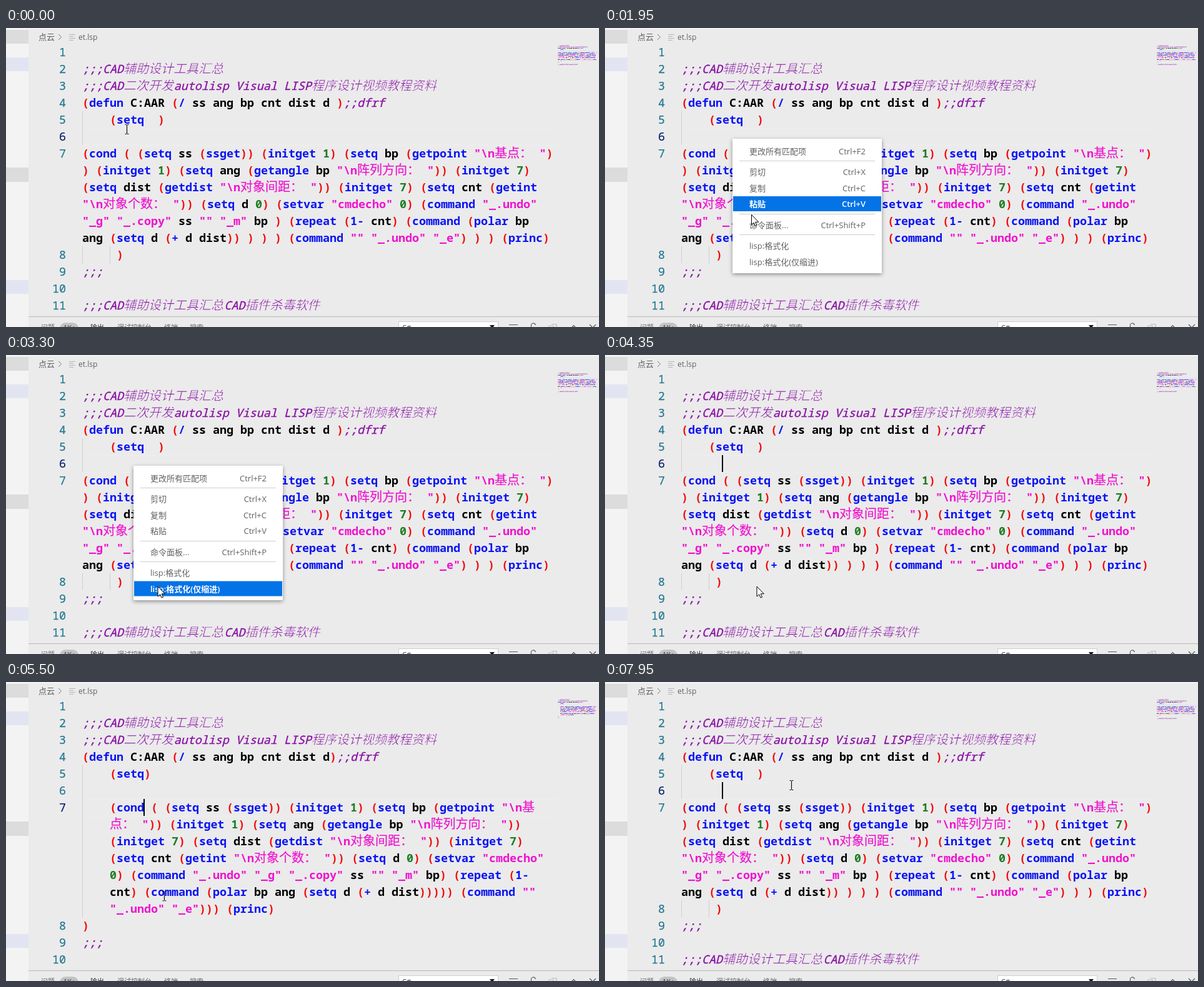
These frames come from a looping animation (949 px wide and 478 px high, 8000 ms). An HTML page:

```html
<!DOCTYPE html>
<html lang="zh">
<head>
<meta charset="utf-8">
<title>et.lsp</title>
<style>
html, body { margin: 0; width: 100%; height: 100%; overflow: hidden; background: #ebebeb; }
svg { display: block; width: 949px; height: 478px; }
text { white-space: pre; }
.code text, .nums text { font: 18.33px "Noto Sans Mono", monospace; }
.code .cjk { font: 300 20px "Noto Sans CJK SC", "Noto Sans CJK", sans-serif; }
.code .par { fill: #f50a0a; font-weight: 600; }
.code .key { fill: #0a14f5; font-weight: 600; }
.code .var { fill: #000; font-weight: 600; }
.code .str { fill: #f012cf; font-weight: 600; }
.code .str.cjk { font-weight: 400; stroke: #f012cf; stroke-width: .2; }
.code .num { fill: #1f7d22; font-weight: 600; }
.code .com { fill: #8a10a6; font-style: italic; stroke: #8a10a6; stroke-width: .35; }
.code.plain text { fill: #000; font-weight: 400; font-style: normal; stroke: none; }
/* a background-coloured outline thins the ideographs */
.code .com.cjk, .code.plain .cjk { font-weight: 300; stroke: #ebebeb; stroke-width: .55; }
.nums text { fill: #237893; stroke: #237893; stroke-width: .25; text-anchor: end; }
.nums .on { fill: #0b216f; stroke: #0b216f; }
.ui { font: 13px "Open Sans", "Noto Sans CJK SC", "Noto Sans CJK", sans-serif; fill: #616161; }
.hot { fill: #fff; font-weight: 600; }
.tabs { font: 11px "Open Sans", "Noto Sans CJK SC", "Noto Sans CJK", sans-serif; fill: #666; }
</style>
</head>
<body>
<svg viewBox="0 0 949 478">
  <rect width="949" height="478" fill="#ebebeb"/>
  <rect x="36" width="913" height="2" fill="#f4f4f4"/>
  <rect width="36" height="478" fill="#f3f3f3"/>
  <g fill="#dcdcdc"><rect y="3" width="36" height="22"/><rect y="223" width="36" height="23"/></g>
  <g fill="#e2e5f1"><rect y="47" width="36" height="22"/><rect y="403" width="36" height="22"/></g>

  <g class="ui">
    <text x="52" y="19">点云</text>
    <text x="116" y="19" font-size="12" style="font-size:12px">et.lsp</text>
  </g>
  <path d="M84 10l4.5 4.5-4.5 4.5" fill="none" stroke="#777"/>
  <path d="M101 10.5h10M101 13.5h7M101 16.5h10M101 19.5h7" stroke="#b4b4b4"/>

  <g id="editor"></g>

  <path d="M36 461.5h913" stroke="#b9b9b9"/>
  <g class="tabs">
    <text x="56" y="483">问题</text>
    <rect x="86" y="471" width="30" height="18" rx="9" fill="#c4c4c4"/>
    <text x="92" y="483" fill="#333">1K+</text>
    <text x="135" y="483" fill="#333">输出</text>
    <text x="178" y="483">调试控制台</text>
    <text x="253" y="483">终端</text>
    <text x="294" y="483">搜索</text>
    <rect x="628.5" y="469.5" width="159" height="20" fill="#fff" stroke="#cecece"/>
    <text x="634" y="483" fill="#333">C#</text>
  </g>
  <path d="M774 475h8l-4 5z" fill="#111"/>
  <g fill="none" stroke="#555" stroke-width="1.2">
    <path d="M805 474.5h14M805 478.5h14"/>
    <path d="M840.5 478v-2a3.5 3.5 0 0 1 7 -1"/>
    <path d="M904 480l4.5-4.5 4.5 4.5"/>
    <path d="M934 474l10 10M944 474l-10 10"/>
    <path d="M869 478v-2h7v2M873 473.5h8v5" stroke="#bbb"/>
  </g>

  <g id="menu"></g>
  <path id="beam" d="M-3 -7.5h2.5M.5 -7.5h2.5M0 -7v14M-3 7.5h2.5M.5 7.5h2.5" stroke="#111" stroke-width="1.2"/>
  <path id="arrow" d="M.5.5V16.5L4.2 13.2 6.6 18.6 9 17.6 6.7 12.3H11.8Z" fill="#fff" stroke="#000"/>
</svg>
<script>
const LOOP = 8000, STEP = 50, ROW = 27, COL = 11, LEFT = 122;
const $ = id => document.getElementById(id);

function add(parent, tag, attrs = {}, text = '') {
  const el = document.createElementNS('http://www.w3.org/2000/svg', tag);
  for (const k in attrs) el.setAttribute(k, attrs[k]);
  if (text) el.textContent = text;
  return parent.appendChild(el);
}

const HEAD = String.raw`
;;;CAD辅助设计工具汇总
;;;CAD二次开发autolisp Visual LISP程序设计视频教程资料
`;
const MESSY = HEAD + String.raw`(defun C:AAR (/ ss ang bp cnt dist d );;dfrf
    (setq  )

(cond ( (setq ss (ssget)) (initget 1) (setq bp (getpoint "\n基点： ")
) (initget 1) (setq ang (getangle bp "\n阵列方向： ")) (initget 7)
(setq dist (getdist "\n对象间距： ")) (initget 7) (setq cnt (getint
"\n对象个数： ")) (setq d 0) (setvar "cmdecho" 0) (command "_.undo"
"_g" "_.copy" ss "" "_m" bp ) (repeat (1- cnt) (command (polar bp
ang (setq d (+ d dist)) ) ) ) (command "" "_.undo" "_e") ) ) (princ)
     )
;;;

;;;CAD辅助设计工具汇总CAD插件杀毒软件`;
const TIDY = HEAD + String.raw`(defun C:AAR (/ ss ang bp cnt dist d);;dfrf
    (setq)

    (cond ( (setq ss (ssget)) (initget 1) (setq bp (getpoint "\n基
    点： ")) (initget 1) (setq ang (getangle bp "\n阵列方向： "))
    (initget 7) (setq dist (getdist "\n对象间距： ")) (initget 7)
    (setq cnt (getint "\n对象个数： ")) (setq d 0) (setvar "cmdecho"
    0) (command "_.undo" "_g" "_.copy" ss "" "_m" bp) (repeat (1-
    cnt) (command (polar bp ang (setq d (+ d dist))))) (command ""
    "_.undo" "_e"))) (princ)
)
;;;
`;
const KEYS = new Set(('defun / setq cond ssget initget getpoint getangle getdist getint ' +
  'setvar command repeat 1- polar + princ').split(' '));
const TOKEN = /;[^\n]*|"[^"]*"|[()]|\s+|[^\s()";]+/g;

function kind(tok) {
  if (tok[0] === ';') return 'com';
  if (tok[0] === '"') return 'str';
  if (tok === '(' || tok === ')') return 'par';
  if (/^\d+$/.test(tok)) return 'num';
  return KEYS.has(tok) ? 'key' : 'var';
}

function typeset(g, source, wide) {
  let x = LEFT, row = 0;
  for (const tok of source.match(TOKEN)) {
    tok.split('\n').forEach((line, i) => {
      if (i) { row++; x = LEFT; }
      for (const run of line.match(/[ -~]+|[^ -~]+/g) || []) {
        const cjk = run > '~';
        if (run.trim()) {
          add(g, 'text', { x, y: 45 + ROW * row, class: kind(tok) + (cjk ? ' cjk' : '') }, run);
        }
        x += run.length * (cjk ? wide : COL);
      }
    });
  }
}

// One complete editor state: guides, active line, numbers, code, minimap.
function buildView(name, source, plain, active, lastWrap, guides) {
  const g = add($('editor'), 'g'), top = 25 + ROW * active;
  add(g, 'path', { d: `M${LEFT} ${top + .5}H882M${LEFT} ${top + ROW + .5}H882`, stroke: '#efefef' });
  add(g, 'path', { d: guides, stroke: '#cfcfcf' });
  const nums = add(g, 'g', { class: 'nums' });
  for (let r = 0; r < 16; r++) {
    if (r > 6 && r <= lastWrap) continue;
    add(nums, 'text', { x: 96, y: 45 + ROW * r, class: r === active ? 'on' : '' },
      r <= 6 ? r + 1 : r + 7 - lastWrap);
  }
  const code = add(g, 'g', { id: name, class: plain ? 'code plain' : 'code' });
  typeset(code, source, plain ? 20 : 20.2);
  add(g, 'rect', { x: 883, y: 23.8 + top * .08, width: 66, height: 2, fill: '#dae7f6' });
  // two layers, so that the tiny text is dense enough
  for (let i = 0; i < 2; i++) {
    add(g, 'use', { href: '#' + name, transform: 'translate(873.2 23.2) scale(.083 .08)' });
  }
  return g;
}

const GUIDE_A = 'M122.5 133v54M122.5 349v27M166.5 349v27';
const GUIDE_B = 'M122.5 133v243';
const views = {
  messy: buildView('messy', MESSY, false, 5, 11, GUIDE_A),
  messyPlain: buildView('messyPlain', MESSY, true, 5, 11, GUIDE_A),
  tidy: buildView('tidy', TIDY, false, 6, 12, GUIDE_B),
  tidyPlain: buildView('tidyPlain', TIDY, true, 6, 12, GUIDE_B)
};
const caret = add($('editor'), 'rect', { width: 2, height: ROW });

// Context menu
const menu = $('menu');
menu.style.filter = 'drop-shadow(0 2px 3px rgba(0,0,0,.4))';
add(menu, 'rect', { x: 204, y: 177, width: 239, height: 215, fill: '#fff' });
add(menu, 'path', { d: 'M215 212.5h217M215 297.5h217M215 330.5h217', stroke: '#cfcfcf' });
const items = [
  [197, '更改所有匹配项', 'Ctrl+F2'], [230, '剪切', 'Ctrl+X'], [256, '复制', 'Ctrl+C'],
  [281, '粘贴', 'Ctrl+V'], [315, '命令面板...', 'Ctrl+Shift+P'],
  [348, 'lisp:格式化', ''], [373.5, 'lisp:格式化(仅缩进)', '']
].map(([y, label, keys]) => {
  const bar = add(menu, 'rect', { x: 205, y: y - 12, width: 237, height: 24, fill: '#0473e6' });
  const texts = [
    add(menu, 'text', { x: 231, y: y + 5 }, label),
    add(menu, 'text', { x: 417, y: y + 5, 'text-anchor': 'end' }, keys)
  ];
  return { y, bar, texts };
});

// Pointer path: time, x, y
const PATH = [
  [0, 193.5, 162], [100, 195.5, 162], [200, 195.5, 162], [250, 206.5, 175], [350, 206.5, 175],
  [400, 207, 177], [1200, 207, 177], [1250, 205, 176], [1750, 205, 176], [1950, 234, 298],
  [2050, 236, 330], [2400, 236, 330], [3250, 242, 368], [3300, 242.5, 369.5], [4350, 242.5, 369.5],
  [4400, 244.5, 370], [5400, 244.5, 370], [5850, 315.5, 150], [7500, 315.5, 150],
  [7800, 298.5, 165], [LOOP, 298.5, 165]
];
function pointer(t) {
  const i = Math.max(1, PATH.findIndex(k => k[0] >= t));
  const [t0, x0, y0] = PATH[i - 1], [t1, x1, y1] = PATH[i];
  const p = (t - t0) / (t1 - t0), e = p * p * (3 - 2 * p);
  return [x0 + (x1 - x0) * e, y0 + (y1 - y0) * e];
}

const within = (t, ...spans) => spans.some(([a, b]) => t >= a && t < b);
const show = (el, on) => el.setAttribute('visibility', on ? 'visible' : 'hidden');

function draw(ms) {
  const t = Math.floor(ms % LOOP / STEP) * STEP;

  const view = t < 4550 || t >= 7050 ? 'messy' : t < 4600 ? 'tidyPlain' : t < 7000 ? 'tidy' : 'messyPlain';
  for (const k in views) views[k].style.display = k === view ? '' : 'none';

  const tidy = view.startsWith('tidy');
  caret.setAttribute('x', tidy ? 220 : 187);
  caret.setAttribute('y', tidy ? 187 : 160);
  show(caret, within(t, [4350, 4900], [5400, 5900], [6400, 6900], [7000, 7500], [7950, LOOP]));

  menu.style.opacity = t < 4350 ? Math.min(1, Math.max(0, (t - 1250) / 150)) : 0;
  const hoverY = pointer(Math.max(0, t - STEP))[1];
  for (const { y, bar, texts } of items) {
    const hot = t > 1800 && Math.abs(hoverY - y) <= 12.7;
    show(bar, hot);
    texts.forEach(el => el.setAttribute('class', hot ? 'ui hot' : 'ui'));
  }

  const [x, y] = pointer(t), arrow = within(t, [1250, 4400]);
  for (const id of ['beam', 'arrow']) {
    $(id).setAttribute('transform', `translate(${x} ${y})`);
    show($(id), (id === 'arrow') === arrow);
  }
}

const start = performance.now();
(function tick() {
  draw(performance.now() - start);
  requestAnimationFrame(tick);
})();
</script>
</body>
</html>
```
